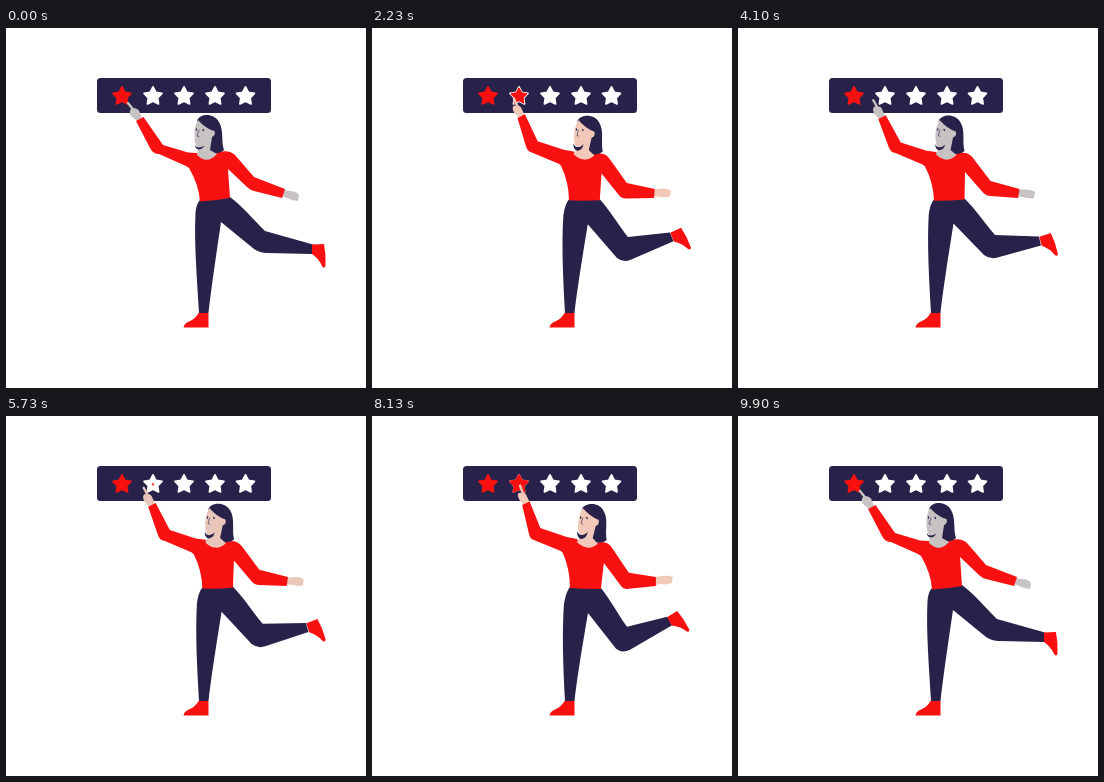
Write an HTML page with a canvas that moves like this. It is 360 px wide and 360 px high and loops after 9.93 s.

```html
<!DOCTYPE html>
<html>
<head>
<meta charset="utf-8">
<style>
  html, body { margin: 0; width: 100%; height: 100%; overflow: hidden; background: #fff; }
  canvas { display: block; width: 360px; height: 360px; }
</style>
</head>
<body>
<canvas></canvas>
<script>
const LOOP = 9930, CYCLE = LOOP / 3, RED = '#f81110', NAVY = '#28224b';
const canvas = document.querySelector('canvas'), ctx = canvas.getContext('2d');
const ratio = window.devicePixelRatio || 1;
canvas.width = canvas.height = 360 * ratio;

const clamp = v => Math.max(0, Math.min(1, v));
const lerp = (a, b, k) => a + (b - a) * k;
const NUMBER = /-?\d+(\.\d+)?/g;
let pose = 0, skin = '';

// Blend two path strings with the same commands by the current pose.
function blend(from, to = from) {
  const ends = to.match(NUMBER);
  let i = 0;
  return new Path2D(from.replace(NUMBER, n => lerp(+n, +ends[i++], pose).toFixed(2)));
}

function fill(color, from, to) {
  ctx.fillStyle = color;
  ctx.fill(blend(from, to));
}

function line(color, width, from, to) {
  ctx.strokeStyle = color;
  ctx.lineWidth = width;
  ctx.stroke(blend(from, to));
}

function star(x, y, size, color) {
  ctx.beginPath();
  for (let i = 0; i < 10; i++) {
    const r = (i % 2 ? 4.9 : 9.4) * size, a = i * Math.PI / 5 - Math.PI / 2;
    ctx.lineTo(x + r * Math.cos(a), y + r * Math.sin(a));
  }
  ctx.closePath();
  ctx.fillStyle = ctx.strokeStyle = color;
  ctx.lineWidth = 1.8 * size;
  ctx.fill();
  ctx.stroke();
}

function rating() {
  ctx.fillStyle = NAVY;
  ctx.beginPath();
  ctx.roundRect(91, 50, 174, 35, 3.5);
  ctx.fill();
  [116, 147, 178, 209, 239.5].forEach((x, i) => star(x, 68.3, 1, i ? '#fff' : RED));
  const grown = clamp((pose - .56) / .23);
  if (grown) star(147, 68.3, grown, RED);
}

function legs() {
  fill(NAVY,
    'M194 172 L224 169 C236 178 246 190 259 203 L307 216.5 L306 226 L261 225 Q254 225 248 221 L215 194 C212 215 206 255 202.5 285 L193 285 C191 250 188 215 189.5 185 Q190 176 194 172Z',
    'M198 171 L229 172 C238 183 245 197 255 211 L295 200.5 L300 209 L258 234 Q250 238 244 233 L216 197 C213 215 206 255 202.5 285 L193 285 C191 250 190 215 192 188 Q194 176 198 171Z');
  fill(RED, 'M192.5 285 L202.5 285 L202.5 299.5 L177.5 299.5 Q178 295 184 293 Q190 290 192.5 285Z');
  ctx.save();
  ctx.translate(lerp(306, 297, pose) + 4 * pose * (1 - pose), lerp(221, 205, pose));
  ctx.rotate(-pose * Math.PI / 6);
  fill(RED, 'M0 -4.5 L12 -5 Q14 5 13.5 17 Q12 20 10 17 Q7 10 0 5Z');
  ctx.restore();
}

function hands() {
  fill(skin,
    'M126 80 Q133 80 134 85 L136 90 L131 93 L125 88 Q122 83 126 80Z',
    'M147 77 Q154 75 155 80 L158 86 L152 89 L148 84 Q145 79 147 77Z');
  line(skin, 2.4, 'M122 75 L129 84', 'M148.5 69.5 L152 79');
  fill(skin,
    'M277 162 L284 163 Q290 163 293 167 L292 173 Q286 173 281 170 L276 168Z',
    'M283 161 L290 160 Q297 159 301 161 L300 167 Q294 169 289 168 L283 169Z');
}

function head() {
  fill(NAVY,
    'M191 93 C194 85 208 85 213 94 C218 102 215 114 218 122 C213 127 206 125 201 124Z',
    'M210 93 C214 86 228 86 232 95 C237 103 233 115 235 124 C230 128 224 127 220 125Z');
  fill(skin,
    'M192 92 Q188 99 188.5 106 Q188 112 190 117 Q191 119 192 119 L191 127 Q201 137 211 126 L204 122 L206 109 Q210 107 208.5 103 Q200 101 192 92Z',
    'M211 92 Q207 100 206.5 106 Q206 112 207 116 Q208 119 210 119 L205 126 Q216 136 226 128 L221 122 L224 110 Q228 109 227 104 Q219 101 211 92Z');
  line(NAVY, 1.3, 'M190.5 101 L190.5 102 M197 101.5 L197.5 102.5', 'M209 101 L209 102 M215 101.5 L215.5 102.5');
  line(NAVY, .6, 'M193 102 L191 108 L193 108.5', 'M211 102 L209.5 107 L211 108');
  // Shadow under the jaw
  fill(NAVY,
    'M189 117 Q190 119.5 193 119.5 Q196 119.5 198 117.5 Q197 121 193 121.5 Q189 121 189 117Z',
    'M205.5 115 Q207 119 210 119 Q214 119 216 115.5 Q215 123 209 123 Q205 122 205.5 115Z');
}

function shirt() {
  fill(RED,
    'M130 93 L137.5 89 L157 117 L182 124.5 L191 125 Q201 137 211 124.5 Q223 121 229 127 L248 149 L279 161 L276 170 L248 163 Q244 162 241 159 L222 141 L224 170 Q208 173 194 173.5 Q193 157 183 140 L180 138 L153 126 Q147 126 144 120Z',
    'M150.5 89 L158 85.5 L168.5 112 L195 121 L205 123 Q216 138 226 126.5 Q236 124 241 133 L257 157 L284 161 L284 170 L257 173 Q252 174 249 170 L232 147 L229 173 Q212 173 198 172 Q198 153 191 137 L189 135 L162 124 Q158 123 157 117Z');
}

function draw(now) {
  // The picture steps at 0 and 30 ms of every tenth of a second.
  const time = now % LOOP, step = time - time % 100 + (time % 100 >= 30 ? 30 : 0);
  // The power makes the swing linger a little at the far pose.
  pose = ((1 - Math.cos(step / CYCLE * 2 * Math.PI)) / 2) ** .9;
  const warm = clamp((pose - .5) / .12);
  skin = `rgb(${lerp(199, 242, warm)}, ${lerp(195, 200, warm)}, ${lerp(194, 184, warm)})`;

  ctx.setTransform(ratio, 0, 0, ratio, 0, 0);
  ctx.clearRect(0, 0, 360, 360);
  ctx.lineCap = ctx.lineJoin = 'round';
  rating();
  legs();
  hands();
  shirt();
  head();
  requestAnimationFrame(draw);
}
requestAnimationFrame(draw);
</script>
</body>
</html>
```
